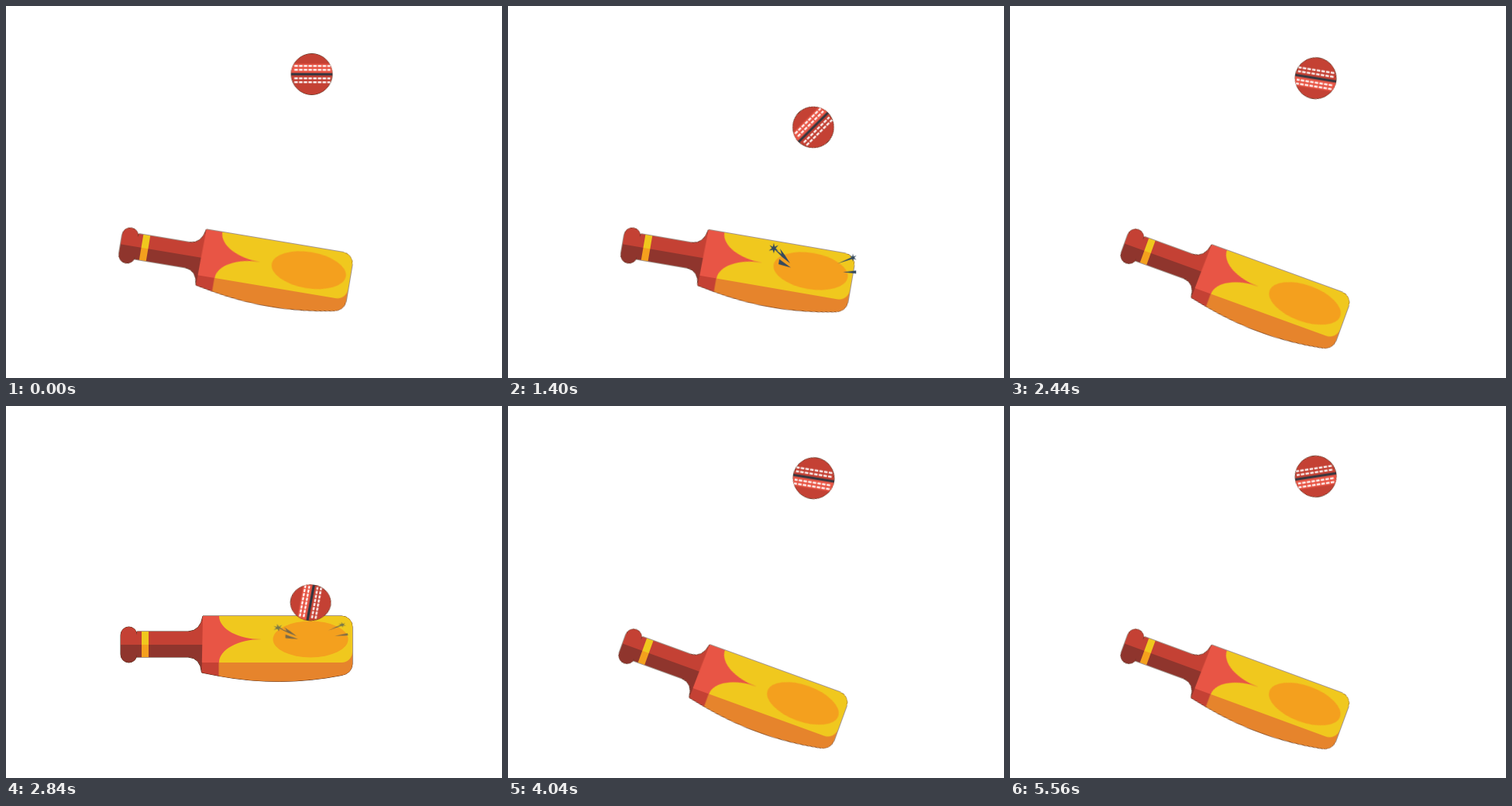
Animation, 640 px wide and 480 px high, one loop 5600 ms. Source, as an HTML page:

```html
<!DOCTYPE html>
<html lang="en">
<head>
<meta charset="utf-8">
<title>Bat and ball</title>
<style>
  html, body { margin: 0; width: 100%; height: 100%; overflow: hidden; background: #fff; }
  svg { display: block; width: 640px; height: 480px; }

  .red { fill: #c44134; }
  .maroon { fill: #8f352d; }
  .coral { fill: #e85545; }
  .yellow { fill: #f0c81e; }
  .amber { fill: #f4a01e; }
  .orange { fill: #e6842c; }
  .slate { fill: #34495e; }
  .edge { fill: #c44134; stroke: #4a2a18; stroke-width: 1; }

  .lift, .swing { transform-origin: 152px 307px; }
  .lift { animation: lift 5.6s infinite; }
  .swing { animation: swing .8s infinite; }
  .fall { animation: fall .8s infinite; }
  .squash { animation: squash .8s linear infinite; }
  .spin { animation: spin 5.6s linear infinite; }
  .spark { transform-origin: 0 300px; animation: burst .8s linear infinite; }
  .left { --side: 1; }
  .right { --side: -1; }

  /* The very first swing starts from a half-raised bat. */
  @keyframes lift {
    0% { transform: rotate(-11.1deg); animation-timing-function: cubic-bezier(.33, 0, .67, 1); }
    7.143%, 100% { transform: rotate(0deg); }
  }
  @keyframes swing {
    0% { transform: rotate(20.6deg); animation-timing-function: cubic-bezier(.33, 0, .67, 1); }
    50% { transform: rotate(0deg); }
    55% { transform: rotate(0deg); animation-timing-function: cubic-bezier(.35, 0, .55, 1); }
    100% { transform: rotate(20.6deg); }
  }
  @keyframes fall {
    0% { transform: translate(394.5px, 88px); animation-timing-function: cubic-bezier(.33, 0, .67, 1); }
    50% { transform: translate(393px, 262px); animation-timing-function: cubic-bezier(.25, 0, .565, 1); }
    100% { transform: translate(394.5px, 88px); }
  }
  @keyframes squash {
    0%, 42% { transform: scale(1, 1); }
    50% { transform: scale(.975, .82); }
    55% { transform: scale(.98, .87); }
    65%, 100% { transform: scale(1, 1); }
  }
  @keyframes spin {
    to { transform: rotate(1260deg); }
  }
  @keyframes burst {
    0%, 50% { opacity: 0; transform: translateX(calc(var(--side) * 12.5px)) scaleY(.625); }
    58%, 80% { opacity: 1; }
    93% { opacity: 0; }
    95%, 100% { opacity: 0; transform: translateX(calc(var(--side) * -10px)) scaleY(1.3); }
  }
</style>
</head>
<body>
<svg viewBox="0 0 640 480">
  <defs>
    <clipPath id="round"><circle r="26.600"/></clipPath>
    <path id="star" d="M0-7 1.2-2 6-4 2.4 0 6 3.5 1.2 2 0 6.5-1.4 2-6.5 3-2.4-.2-5.5-4-1.2-2Z"/>
  </defs>

  <g class="lift"><g class="swing">
    <!-- silhouette -->
    <path class="edge" d="M148 295.500a10.500 10.500 0 0 1 21 0V291H235Q251 290 254 271H433a14 14 0 0 1 14 14V333Q446 345 433 347.500Q354 363 274 348.200L252.500 344Q251 325 235 324H169V320.500a10.500 10.500 0 0 1-21 0Z"/>

    <!-- handle -->
    <path class="red" d="M148 308V295.500a10.500 10.500 0 0 1 21 0V291H235Q251 290 254 271V308Z"/>
    <path class="maroon" d="M148 308V320.500a10.500 10.500 0 0 0 21 0V324H235Q251 325 252.500 344L254 308Z"/>
    <path class="yellow" d="M175 291h9v17h-9z"/>
    <path class="amber" d="M175 308h9v16h-9z"/>

    <!-- blade -->
    <path class="orange" d="M274 300H447V333Q446 345 433 347.500Q354 363 274 348.200Z"/>
    <path class="red" d="M253 330H274.500V348.200L252.500 344Z"/>
    <path class="coral" d="M254 271H340V331H252.800Z"/>
    <path class="yellow" d="M275 271H433a14 14 0 0 1 14 14V317a14 14 0 0 1-14 14H275C275 314 300 301 330 301C300 301 275 288 275 271Z"/>
    <ellipse class="amber" cx="393" cy="301" rx="48.500" ry="23.500"/>

    <!-- impact sparks -->
    <g class="spark left slate"><g transform="rotate(-10 152 307)">
      <use href="#star" x="343" y="313.500"/>
      <path d="M342 313 353 321 351 314 357 322 364 333 354 325ZM350 327.500 365 338.500 349 334Z"/>
    </g></g>
    <g class="spark right slate"><g transform="rotate(-10 152 307)">
      <use href="#star" transform="translate(445 326) scale(.75)"/>
      <path d="M425 333.500 444 325 446 327ZM432 344.500 449 342.500 449 346.500Z"/>
    </g></g>
  </g></g>

  <g class="fall"><g class="squash"><g class="spin">
    <circle class="edge" r="26.400"/>
    <g clip-path="url(#round)">
      <circle class="red" r="26.400"/>
      <path class="coral" d="M-27-13.500H27V-1H-27z"/>
      <path d="M-27 0H27" stroke="#2f3640" stroke-width="3.200"/>
      <path d="M-22.500-10.700H24M-22.500-5.700H24M-22.500 5.300H24M-22.500 10.300H24"
        stroke="#fff" stroke-width="2.300" stroke-dasharray="4.500 1.600"/>
    </g>
  </g></g></g>
</svg>
</body>
</html>
```
